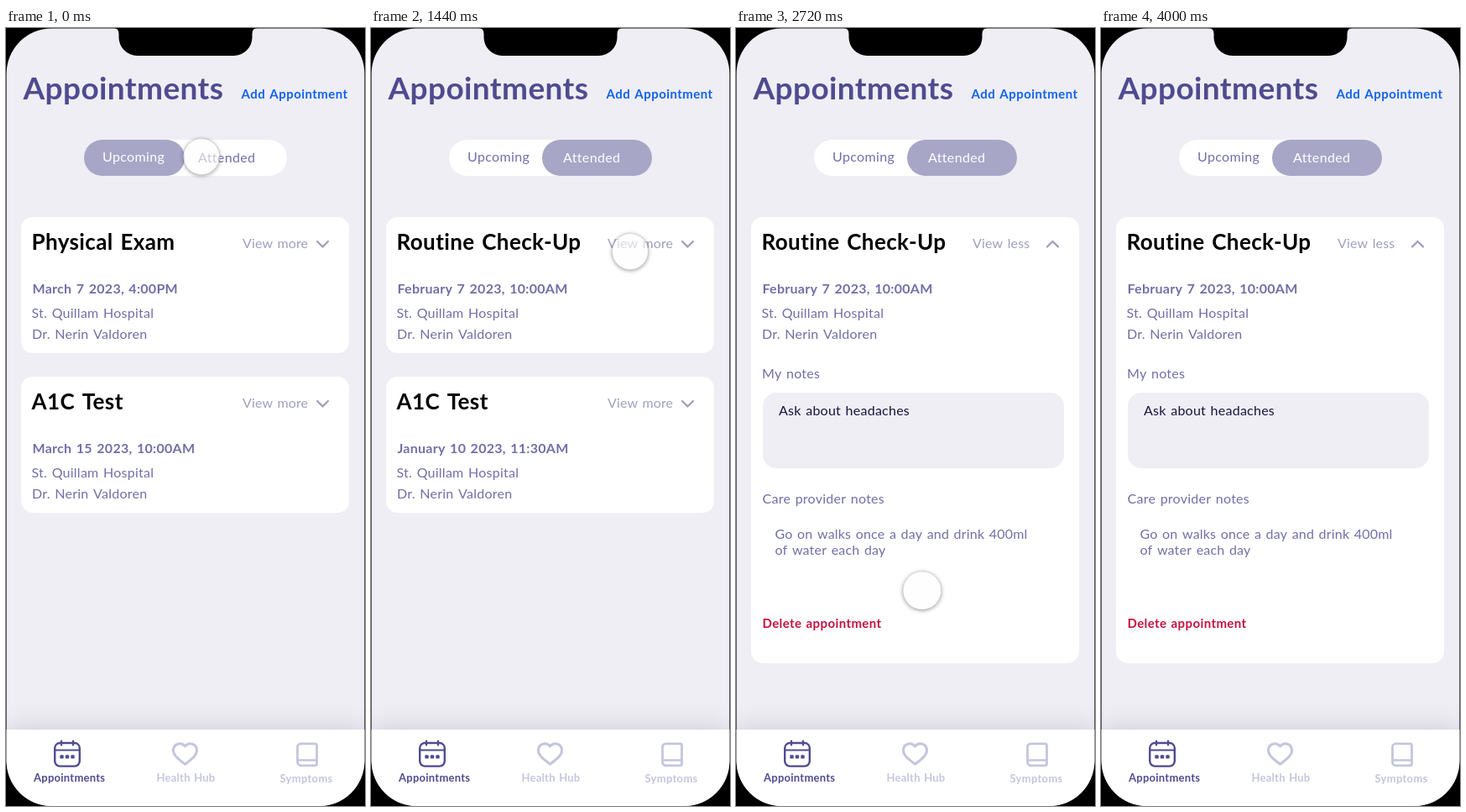
An HTML page with a canvas for the animation above (4.08 s loop, 428 px wide and 926 px high).

```html
<!DOCTYPE html>
<html lang="en">
<head>
<meta charset="utf-8">
<title>Appointments</title>
<style>
html, body { margin: 0; width: 100%; height: 100%; overflow: hidden; background: #000; }
canvas { display: block; width: 428px; height: 926px; }
</style>
</head>
<body>
<canvas id="stage"></canvas>
<script>
const W = 428, H = 926, LOOP = 4080;
const canvas = document.getElementById('stage');
const ctx = canvas.getContext('2d');
const ratio = window.devicePixelRatio || 1;
canvas.width = W * ratio;
canvas.height = H * ratio;

const BG = '#efeef4', INK = '#4f4b90', SOFT = '#716fa8', PALE = '#a09fc0',
      PILL = '#a7a6c7', TAB = '#c3c6dd', LINK = '#0f62ee', RED = '#c4123f';
const HOSPITAL = 'St. Quillam Hospital', DOCTOR = 'Dr. Nerin Valdoren';

// Touch point over time: [ms, x, y]
const TOUCH = [
  [0, 233, 153], [160, 240, 158], [800, 278, 216], [1360, 308, 264],
  [1440, 309, 266], [1600, 309, 268], [2160, 306, 301],
  [2720, 222, 669], [3040, 217, 768], [3440, 221, 843], [3920, 228, 960]
];

const clamp = v => Math.max(0, Math.min(1, v));
const mix = (a, b, k) => a + (b - a) * k;
const ramp = (t, from, to) => clamp((t - from) / (to - from));
const easeOut = k => 1 - Math.pow(1 - k, 3);

function touchAt(t) {
  let i = 0;
  while (i < TOUCH.length - 2 && t > TOUCH[i + 1][0]) i++;
  const a = TOUCH[i], b = TOUCH[i + 1], span = b[0] - a[0];
  const k = clamp((t - a[0]) / span);
  const slope = (n, c) => {
    const p = TOUCH[Math.max(0, n - 1)], q = TOUCH[Math.min(TOUCH.length - 1, n + 1)];
    return (q[c] - p[c]) / (q[0] - p[0]);
  };
  const axis = c => {
    const k2 = k * k, k3 = k2 * k;
    return (2 * k3 - 3 * k2 + 1) * a[c] + (k3 - 2 * k2 + k) * span * slope(i, c)
      + (3 * k2 - 2 * k3) * b[c] + (k3 - k2) * span * slope(i + 1, c);
  };
  return [axis(1), axis(2)];
}

function text(str, x, y, size, color, weight = 400, track = 0.25, alpha = 1) {
  if (alpha <= 0) return;
  ctx.save();
  ctx.globalAlpha *= alpha;
  ctx.font = `${weight} ${size}px Lato, "Open Sans", sans-serif`;
  ctx.letterSpacing = track + 'px';
  ctx.wordSpacing = size * 0.075 + 'px';
  ctx.fillStyle = color;
  ctx.fillText(str, x, y);
  ctx.restore();
}

function box(x, y, w, h, r, color) {
  ctx.beginPath();
  ctx.roundRect(x, y, w, h, r);
  ctx.fillStyle = color;
  ctx.fill();
}

function line(points, color, width) {
  ctx.beginPath();
  points.forEach(([x, y], i) => i ? ctx.lineTo(x, y) : ctx.moveTo(x, y));
  ctx.strokeStyle = color;
  ctx.lineWidth = width;
  ctx.stroke();
}

function layer(alpha, draw) {
  if (alpha <= 0) return;
  ctx.save();
  ctx.globalAlpha *= alpha;
  draw();
  ctx.restore();
}

function header(k) {
  text('Appointments', 20.5, 85, 37, INK, 700, 0.4);
  text('Add Appointment', 280.5, 84, 15, LINK, 700, 0.45);
  box(93, 133, 242, 43, 21.5, '#fff');
  box(mix(93, 204, k), 133, mix(120, 131, k), 43, 21.5, PILL);
  text('Upcoming', 115, 159, 16, '#fff', 400, 0.35, 1 - k);
  text('Upcoming', 115, 159, 16, SOFT, 400, 0.35, k);
  text('Attended', 229, 160, 16, SOFT, 400, 0.35, 1 - k);
  text('Attended', 229, 160, 16, '#fff', 400, 0.35, k);
}

// Chevron points down at k = 0 and up at k = 1
function viewToggle(y, k) {
  text('View more', 282, y + 37, 16, PALE, 400, 0.12, 1 - k);
  text('View less', 282, y + 37, 16, PALE, 400, 0.15, k);
  const d = mix(3.2, -3.2, k), cy = y + 32.2;
  ctx.lineCap = 'round';
  line([[371, cy - d], [377.5, cy + d], [384, cy - d]], PALE, 2.2);
}

function cardText(y, title, date, alpha) {
  text(title, 30.5, y + 39, 26, '#000', 700, 0.4, alpha);
  text(date, 31.5, y + 91, 16, SOFT, 700, 0.28, alpha);
}

function card(y, h, before, after, swap, open) {
  box(18, y, 391, h, 14, '#fff');
  cardText(y, ...before, 1 - swap);
  cardText(y, ...after, swap);
  text(HOSPITAL, 30.5, y + 120, 16, SOFT);
  text(DOCTOR, 31, y + 145, 16, SOFT);
  viewToggle(y, open);
}

function notes() {
  text('My notes', 31, 417, 16, SOFT);
  box(32, 434, 359, 90, 16, BG);
  text('Ask about headaches', 51, 461, 16, '#17143f');
  text('Care provider notes', 31.5, 566, 16, SOFT);
  text('Go on walks once a day and drink 400ml', 46.5, 608, 16, SOFT, 400, 0.2);
  text('of water each day', 46.5, 627, 16, SOFT, 400, 0.2);
  text('Delete appointment', 31.5, 714, 15, RED, 700, 0.4);
}

function calendarIcon() {
  ctx.lineCap = 'round';
  ctx.strokeStyle = INK;
  ctx.lineWidth = 2.4;
  ctx.beginPath();
  ctx.roundRect(58.2, 851, 29.6, 27.6, 6);
  ctx.stroke();
  line([[58.5, 859.5], [87.5, 859.5]], INK, 2.2);
  for (const x of [66, 80]) line([[x, 848.5], [x, 853.5]], INK, 2.2);
  for (const x of [66.5, 73, 79.5]) box(x - 2.2, 865.2, 4.4, 4.4, 1.2, INK);
}

function heartIcon() {
  ctx.beginPath();
  ctx.moveTo(213.5, 855);
  ctx.bezierCurveTo(209, 849.5, 199.5, 851.5, 199.5, 860);
  ctx.bezierCurveTo(199.5, 865.5, 205, 869.5, 213.5, 876.3);
  ctx.bezierCurveTo(222, 869.5, 227.5, 865.5, 227.5, 860);
  ctx.bezierCurveTo(227.5, 851.5, 218, 849.5, 213.5, 855);
  ctx.closePath();
  ctx.lineJoin = 'round';
  ctx.strokeStyle = TAB;
  ctx.lineWidth = 3;
  ctx.stroke();
}

function bookIcon() {
  ctx.strokeStyle = TAB;
  ctx.lineWidth = 2.8;
  ctx.beginPath();
  ctx.roundRect(347.5, 851.8, 23, 26, [4, 2, 2, 4]);
  ctx.stroke();
  line([[349, 871.5], [370, 871.5]], TAB, 2.6);
}

function tabBar() {
  ctx.save();
  ctx.shadowColor = 'rgba(80, 80, 125, 0.24)';
  ctx.shadowBlur = 28 * ratio;
  box(0, 835, W, 91, 0, '#fff');
  ctx.restore();
  calendarIcon();
  heartIcon();
  bookIcon();
  text('Appointments', 33, 897, 13, INK, 700, 0.25);
  text('Health Hub', 179.5, 897, 13, TAB, 700, 0.25);
  text('Symptoms', 326.5, 898, 13, TAB, 700, 0.3);
}

function touch(t) {
  if (t >= 3920) return;
  const [x, y] = touchAt(t);
  const press = Math.max(1 - ramp(t, 80, 200), ramp(t, 1300, 1400) * (1 - ramp(t, 1520, 1640)));
  const r = mix(22.8, 21.5, press);
  const disc = () => {
    ctx.beginPath();
    ctx.arc(x, y, r, 0, Math.PI * 2);
  };
  // Shadow falls outside the disc only
  ctx.save();
  ctx.beginPath();
  ctx.rect(0, 0, W, H + 60);
  ctx.arc(x, y, r, 0, Math.PI * 2);
  ctx.clip('evenodd');
  ctx.shadowColor = 'rgba(0, 0, 0, 0.42)';
  ctx.shadowBlur = 5 * ratio;
  ctx.shadowOffsetY = ratio;
  disc();
  ctx.fillStyle = '#fff';
  ctx.fill();
  ctx.restore();
  disc();
  ctx.fillStyle = 'rgba(253, 253, 254, 0.62)';
  ctx.fill();
  ctx.strokeStyle = 'rgba(125, 125, 135, 0.3)';
  ctx.lineWidth = 0.8;
  ctx.stroke();
}

function notch() {
  ctx.beginPath();
  ctx.moveTo(128, 0);
  ctx.quadraticCurveTo(134.5, 0, 134.5, 7);
  ctx.lineTo(134.5, 11);
  ctx.arcTo(134.5, 33, 156, 33, 22);
  ctx.lineTo(272, 33);
  ctx.arcTo(293.5, 33, 293.5, 11, 22);
  ctx.lineTo(293.5, 7);
  ctx.quadraticCurveTo(293.5, 0, 300, 0);
  ctx.fillStyle = '#000';
  ctx.fill();
}

function draw(t) {
  const swap = easeOut(ramp(t, 80, 400));
  const open = easeOut(ramp(t, 1520, 1820));
  ctx.setTransform(ratio, 0, 0, ratio, 0, 0);
  ctx.fillStyle = '#000';
  ctx.fillRect(0, 0, W, H);
  ctx.save();
  ctx.beginPath();
  ctx.roundRect(0.6, 0.5, W - 1.2, H - 0.5, 54);
  ctx.clip();
  ctx.fillStyle = BG;
  ctx.fillRect(0, 0, W, H);
  header(swap);
  layer(1 - open, () => card(415, 162, ['A1C Test', 'March 15 2023, 10:00AM'],
    ['A1C Test', 'January 10 2023, 11:30AM'], swap, 0));
  card(225, mix(162, 531, open), ['Physical Exam', 'March 7 2023, 4:00PM'],
    ['Routine Check-Up', 'February 7 2023, 10:00AM'], swap, open);
  layer(open, notes);
  tabBar();
  touch(t);
  ctx.restore();
  notch();
}

const start = performance.now();
function tick() {
  draw((performance.now() - start) % LOOP);
  requestAnimationFrame(tick);
}
tick();
</script>
</body>
</html>
```
